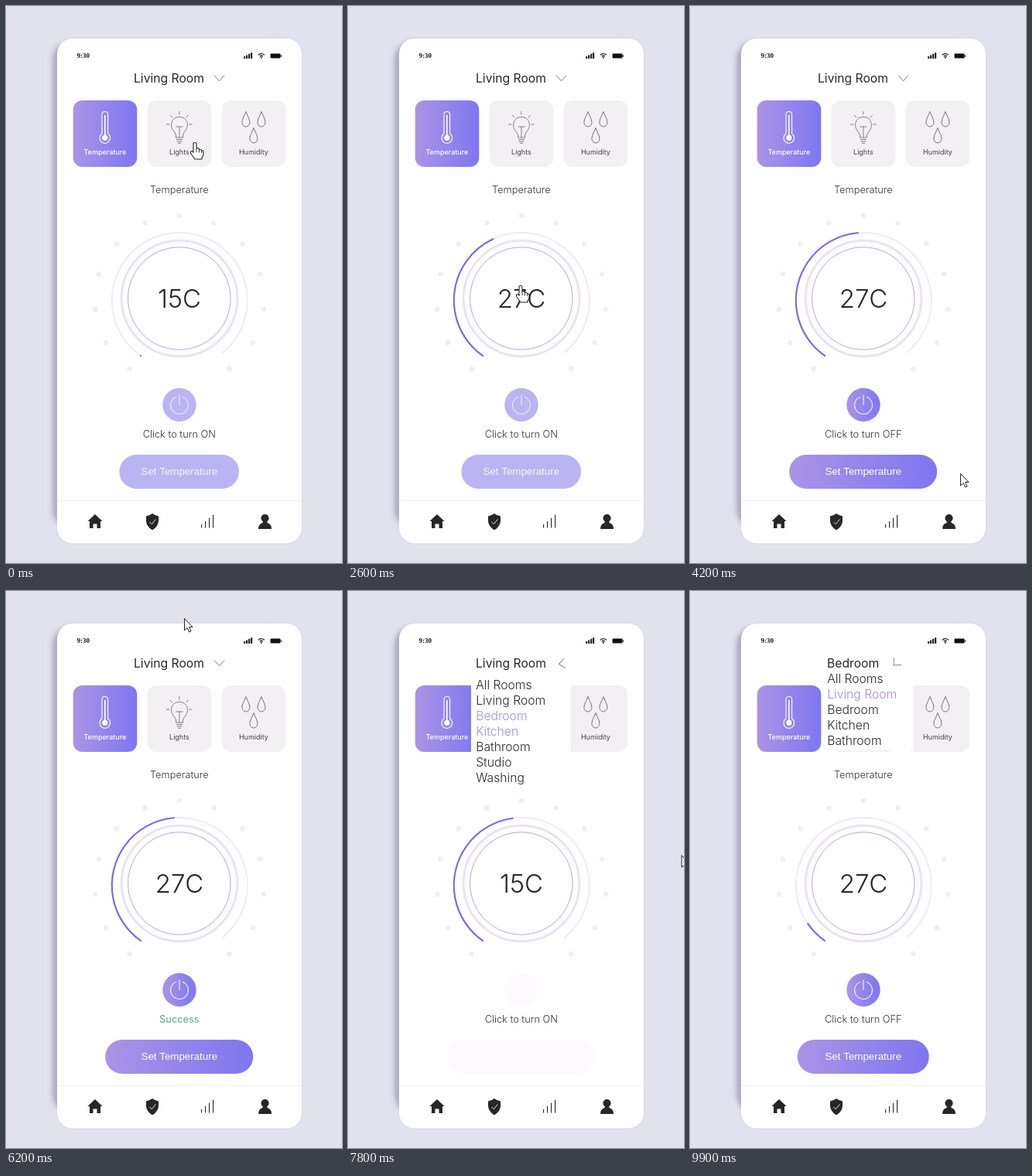
Recreate the animation shown at these times as an HTML page with a canvas. Size 434 by 720 pixels, loop 10 s.

```html
<!DOCTYPE html>
<html lang="en">
<head>
<meta charset="utf-8">
<title>Smart home</title>
<style>
html, body { margin: 0; width: 100%; height: 100%; overflow: hidden; background: #e2e1ee; }
canvas { display: block; }
</style>
</head>
<body>
<canvas id="stage" width="434" height="720"></canvas>
<script>
const ctx = document.getElementById('stage').getContext('2d');
const LOOP = 10000, STEP = 100;
const INK = '#27272b', SOFT_INK = '#333238', VIOLET = '#a18de2', PAPER = '#fefefe';
const SANS = 'Inter, sans-serif';
const ROOMS = ['All Rooms', 'Living Room', 'Bedroom', 'Kitchen', 'Bathroom', 'Studio', 'Washing'];
// Times of the user's actions.
const SCROLL = 1100, POWER = 3400, CONFIRM = 4900, OPEN = 6400, PICK = 7740, REOPEN = 8900, RETURN = 9720;

const rad = deg => deg * Math.PI / 180;
const mix = (a, b, p) => a + (b - a) * p;
const ease = p => { p = Math.min(1, Math.max(0, p)); return p * p * (3 - 2 * p); };
const ramp = (t, start, length) => ease((t - start) / length);

const spot = (x, y, hand = true) => ({ x, y, hand });
const dial = spot(223, 361), chevron = spot(240, 96), away = spot(507, 403, false);
// Each visit is an arrival time and a place.
const VISITS = [
  [0, spot(244, 176)], [400, spot(223, 387)], [800, dial], [3200, spot(238, 533)],
  [4200, spot(349, 604, false)], [4600, spot(231, 604)], [5300, spot(401, 545, false)],
  [6200, spot(230, 35, false)], [6500, chevron], [7200, spot(212, 165)], [7900, away],
  [8700, chevron], [9100, spot(289, 178)], [9400, spot(225, 134)], [9900, away]
];

function pointerAt(t) {
  const next = VISITS.findIndex(([at]) => at > t);
  if (next < 0) return away;
  const [at, to] = VISITS[next], from = VISITS[next - 1][1];
  const p = ramp(t, at - 300, 300);
  return spot(mix(from.x, to.x, p), mix(from.y, to.y, p), p < .5 ? from.hand : to.hand);
}

function shape(d, fill, stroke, width = 1) {
  const path = new Path2D(d);
  if (fill) { ctx.fillStyle = fill; ctx.fill(path); }
  if (stroke) { ctx.strokeStyle = stroke; ctx.lineWidth = width; ctx.stroke(path); }
}
function box(x, y, w, h, r, fill) {
  ctx.fillStyle = fill;
  ctx.beginPath();
  ctx.roundRect(x, y, w, h, r);
  ctx.fill();
}
function ring(x, y, r, stroke, width, from = 0, to = 360) {
  ctx.strokeStyle = stroke;
  ctx.lineWidth = width;
  ctx.beginPath();
  ctx.arc(x, y, r, rad(from), rad(to));
  ctx.stroke();
}
function disc(x, y, r, fill) {
  ctx.fillStyle = fill;
  ctx.beginPath();
  ctx.arc(x, y, r, 0, 7);
  ctx.fill();
}
function label(str, x, y, size, color, align = 'center', weight = 400, family = SANS) {
  ctx.font = `${weight} ${size}px ${family}`;
  ctx.textAlign = align;
  ctx.fillStyle = color;
  ctx.fillText(str, x, y);
}
function violetFill(x0, x1) {
  const g = ctx.createLinearGradient(x0, 0, x1, 0);
  g.addColorStop(0, '#aa94e6');
  g.addColorStop(1, '#7f76f0');
  return g;
}
function placed(x, y, draw, turn = 0) {
  ctx.save();
  ctx.translate(x, y);
  ctx.rotate(rad(turn));
  draw();
  ctx.restore();
}

function drawPhone() {
  ctx.fillStyle = '#e2e1ee';
  ctx.fillRect(0, 0, 434, 720);
  ctx.save();
  ctx.shadowColor = 'rgba(70,68,95,.6)';
  ctx.shadowBlur = 10;
  box(62.5, 50, 290, 620, 18, '#b5b4c2');
  ctx.shadowColor = 'rgba(120,115,160,.15)';
  ctx.shadowBlur = 3;
  box(66, 42, 316, 652.5, 20, PAPER);
  ctx.restore();
}

function drawStatusBar() {
  label('9:30', 91.5, 67, 9, '#111', 'left', 700, '"Liberation Serif", serif');
  for (let i = 0; i < 4; i++) box(307 + i * 3, 65 - i * 1.6, 2.2, 3 + i * 1.6, .4, INK);
  for (const r of [2.6, 5.4]) ring(329.8, 67, r, INK, 1.4, 222, 318);
  disc(329.8, 66.8, 1.1, INK);
  box(341.5, 61.5, 13, 6, 1.2, '#111');
  box(355, 63.2, 1, 2.6, .4, '#111');
}

function drawCards() {
  ['Temperature', 'Lights', 'Humidity'].forEach((name, i) => {
    const x = 86.7 + i * 96;
    box(x, 122, 82.6, 86, 12, i ? '#f2f0f3' : violetFill(x, x + 82.6));
    label(name, x + 41.2, 192, 9, i ? '#45434b' : '#fff', 'center', i ? 400 : 500);
  });

  shape('M124 165V140Q124 136.500 127.800 136.500Q131.600 136.500 131.600 140V165A6.800 6.800 0 1 1 124 165Z', null, '#fff', 1.1);
  box(127, 141, 1.6, 27, 0, '#fff');
  disc(127.8, 170.3, 3.6, '#fff');

  const line = '#77747c';
  shape('M219.500 170V167Q219 164 216 161C211.500 155 213 143.500 224 143.500C235 143.500 236.500 155 232 161Q229 164 228.500 167V170Z'
    + 'M220 172.500H228M220.500 175H227.500M222 177.300H226M224 170V156M219.500 156H228.500', null, line, .9);
  for (let a = -90; a <= 90; a += 45) {
    placed(223.8, 153, () => shape('M0 -12.500V-16.800', null, line, .9), a);
  }
  for (const side of [-1, 0, 1]) {
    placed(319.9 + side * 10, side ? 136.5 : 157.5,
      () => shape('M0 0C1.500 5 5 9 5 14A5 5.500 0 0 1 -5 14C-5 9 -1.500 5 0 0Z', null, line, 1));
  }
}

function drawDial(t, temp) {
  label('Temperature', 223.8, 242.3, 12.8, SOFT_INK, 'center', 300);
  for (let i = -6; i <= 6; i++) {
    placed(224, 380.5, () => disc(0, -109.5, 3.3, '#f0eff2'), i * 24);
  }
  ring(224.3, 380.5, 87.5, '#efecf2', 2, 125, 411);
  ring(224, 378, 74.8, '#f4f0f8', 4);
  ring(224, 378, 74.8, '#e5deec', 1.4);
  ring(223.8, 378, 66.2, '#b3a9e4', 1);
  const sweep = 140 * (ramp(t, SCROLL, 1970) - ramp(t, PICK, 750) + ramp(t, RETURN, 750));
  ctx.lineCap = 'round';
  ring(224.3, 380.5, 87.5, '#7b6bdb', 2.1, 125, 125.1 + sweep);
  ctx.lineCap = 'butt';
  label(temp + 'C', 224, 390.4, 33, INK, 'center', 300);
}

function drawControls(t, on) {
  const fade = t < PICK ? 1 : ramp(t, PICK, 800);
  const shade = `rgb(${[[255, 187], [250, 180], [254, 242]].map(([a, b]) => Math.round(mix(a, b, fade)))})`;
  const wide = ramp(t, POWER - 20, 400) - ramp(t, PICK, 400) + ramp(t, RETURN, 400);
  const half = mix(77.3, 95.5, wide);

  disc(224, 515.5, 21.7, on ? violetFill(202, 246) : shade);
  const icon = on ? '#eeebff' : `rgba(232,228,252,${fade})`;
  ring(224, 516, 11.5, icon, 1.1, -70, 250);
  shape('M224 502.500V516', null, icon, 1.2);

  const success = t >= CONFIRM && t < 7000;
  const hint = success ? 'Success' : `Click to turn ${on ? 'OFF' : 'ON'}`;
  label(hint, 223.8, 558, 12.8, success ? '#54a883' : SOFT_INK, 'center', success ? 400 : 300);
  box(223.7 - half, 580, half * 2, 44, 22, on ? violetFill(223.7 - half, 223.7 + half) : shade);
  label('Set Temperature', 223.8, 606, 13.333, on ? '#fff' : `rgba(246,244,255,${fade})`,
    'center', 400, '"Liberation Sans", Arial, sans-serif');
}

function drawNavigation() {
  box(66, 639, 316, 1, 0, '#f2f1f5');
  shape('M115 657L124.500 666H122V675H117.500V669.500H112.500V675H108V666H105.500Z', INK);
  shape('M189 656Q193 659 197 659.500V666Q196.500 673 189 677.500Q181.500 673 181 666V659.500Q185 659 189 656Z', INK);
  shape('M185.500 667L188.300 669.800L193.300 663.500', null, '#ddd', 1);
  for (let i = 0; i < 4; i++) box(252 + i * 5, 670 - i * 4.1, 1.1, 4.5 + i * 4.1, 0, INK);
  disc(334.5, 662, 5.1, INK);
  shape('M326 676Q326 669.500 331 668.500L332 666H337L338 668.500Q343 669.500 343 676Z', INK);
}

function drawDropdown(t) {
  const bedroom = t >= PICK + 500;
  const left = bedroom ? 178 : 166;
  const opened = (inLength, outLength) => ramp(t, OPEN, inLength) - ramp(t, PICK, outLength)
    + ramp(t, REOPEN, inLength) - ramp(t, RETURN, outLength);
  const open = opened(450, 460);

  if (open > .01) {
    const hovered = t < 7000 ? [] : t < 9300 ? [2, 3] : [1];
    ctx.save();
    ctx.beginPath();
    ctx.rect(left - 7, 102, 295 - left, 157 * open);
    ctx.clip();
    box(left - 7, 102, 295 - left, 157, 0, PAPER);
    ROOMS.forEach((room, i) => {
      const y = 111.6 + 17.3 * open * open + i * 20;
      label(room, left - .8, y, 15.7, hovered.includes(i) ? VIOLET : INK, 'left', 300);
    });
    ctx.restore();
  }
  label(bedroom ? 'Bedroom' : 'Living Room', left - 1, 98.7, 15.7, INK, 'left', 400);
  placed(bedroom ? 265 : 275.5, 94, () => shape('M-6.500 -4.500L0 3L6.500 -4.500', null, '#85838c', 1), 90 * opened(420, 360));
}

function drawPointer(t) {
  const { x, y, hand } = pointerAt(t);
  ctx.lineJoin = 'round';
  placed(x, y, () => {
    if (hand) {
      shape('M-2 12.500V2Q-2 .5 0 .5Q2 .5 2 2V8Q5 7 5.500 9.500Q8 8.500 8.500 11Q11 10.500 11 13V15.500Q11 18 9 20V22H0'
        + 'L-5 15Q-6.500 11.500 -4 11.500Q-3 11.500 -2 13.500Z', '#fff', '#222', 1.1);
      shape('M2 8V13M5.500 9.500V13.500M8.500 11V14', null, '#222', .9);
    } else {
      shape('M.5 .5V16L4.200 12.600L6.600 18L9 17L6.600 11.500H11Z', '#fff', '#222', 1);
    }
  });
}

function draw(t) {
  const on = (t >= POWER && t < PICK) || t >= RETURN;
  const scrolled = Math.min(12, Math.max(0, Math.floor((t - SCROLL) / 100) + 1));
  const temp = 15 + (t < PICK || t >= RETURN ? scrolled : 0);
  drawPhone();
  drawStatusBar();
  drawCards();
  drawDial(t, temp);
  drawControls(t, on);
  drawNavigation();
  drawDropdown(t);
  drawPointer(t);
}

const start = performance.now();
function frame() {
  const t = (performance.now() - start) % LOOP;
  draw(Math.floor(t / STEP) * STEP);
  requestAnimationFrame(frame);
}
frame();
</script>
</body>
</html>
```
